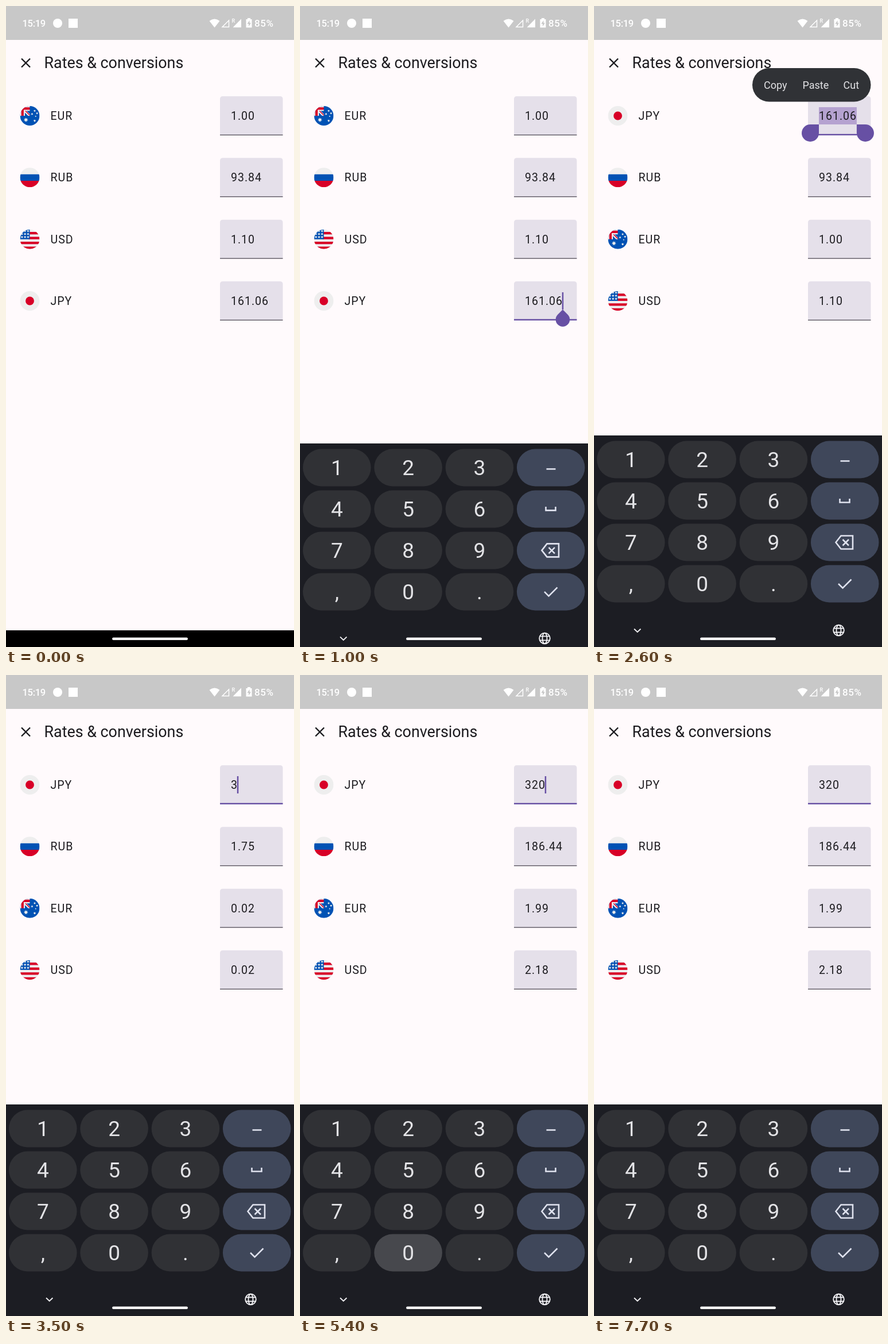
An HTML page for the animation above (8 s loop, 502 by 1115 pixels).

```html
<!DOCTYPE html>
<html lang="en">
<head>
<meta charset="utf-8">
<title>Rates &amp; conversions</title>
<style>
  html, body { margin: 0; width: 100%; height: 100%; overflow: hidden; background: #fffafc; }
  svg { display: block; }
  text { font-family: Roboto, sans-serif; }
  .body { font-size: 19.5px; letter-spacing: 1px; fill: #1c1b1f; }
  .digit { font-size: 37px; text-anchor: middle; fill: #e3e3e6; }
  .icon { fill: none; stroke: #dfe2ee; stroke-width: 2.6; }
  .menu text { font-size: 18px; fill: #e3e3e6; }
  .accent { fill: #6750a4; }
</style>
</head>
<body>
<svg id="stage" width="502" height="1115" viewBox="0 0 502 1115">
  <defs>
    <clipPath id="round"><circle cx="256" cy="256" r="256"/></clipPath>
    <clipPath id="inner"><rect x="391" y="-20" width="72" height="40"/></clipPath>
    <path id="grip" d="M0 0H15A15 15 0 1 1 0 15Z"/>
  </defs>
  <rect width="502" height="1115" fill="#fffafc"/>
  <rect width="502" height="59" fill="#c8c8c8"/>
  <g fill="#fff" font-weight="500">
    <text x="28.5" y="36" font-size="16.5" letter-spacing="-.3">15:19</text>
    <circle cx="90" cy="30" r="8"/>
    <rect x="109" y="22" width="16" height="16"/>
    <path d="M354.500 26Q363.500 19 372.500 26L363.500 37.500Z"/>
    <path d="M377 36.500H388.500V25Z" fill="none" stroke="#fff" stroke-width="1.500"/>
    <text x="393.500" y="29" font-size="9">R</text>
    <path d="M395.500 37.300L410 22.500V37.300Z"/>
    <path d="M421 21h5v2h2.500v14.500h-10V23h2.500Z"/>
    <path d="M424.500 25l-4 6h2.500v4.500l4-6h-2.500Z" fill="#c8c8c8"/>
    <text x="433" y="36" font-size="17" letter-spacing=".6">85%</text>
  </g>
  <path d="M27 91.500L42 106.500M42 91.500L27 106.500" stroke="#1c1b1f" stroke-width="2.400"/>
  <text x="66.500" y="108" font-size="26.850" fill="#1c1b1f">Rates &amp; conversions</text>

  <g id="rows"></g>

  <g id="menu" class="menu">
    <rect x="276" y="108" width="206.500" height="58.500" rx="29.250" fill="#303236"/>
    <text x="296" y="143.500">Copy</text>
    <text x="363.500" y="143.500">Paste</text>
    <text x="434.500" y="143.500">Cut</text>
  </g>

  <rect y="1086" width="502" height="29"/>
  <g id="board">
    <rect y="747" width="502" height="480" fill="#1c1d23"/>
    <g id="keys"></g>
    <g class="icon">
      <path d="M429.500 791.500h16"/>
      <path d="M428.500 857v6.500h17V857"/>
      <path d="M421.500 933l9-11.500h20.500v23h-20.500ZM433.500 928l10.500 10.500M444 928l-10.500 10.500"/>
      <path d="M426 1005l7.500 7.500 15-15"/>
    </g>
    <g fill="none" stroke="#f0f0f3" stroke-width="1.900">
      <path d="M70 1083.500l5.700 5.500 5.700-5.500"/>
      <circle cx="426.500" cy="1086" r="9.300"/>
      <ellipse cx="426.500" cy="1086" rx="4" ry="9.300"/>
      <path d="M418 1082.500h17M418 1089.500h17"/>
    </g>
  </g>
  <rect x="185" y="1098.500" width="132" height="4.500" rx="2.250" fill="#f5f5f5"/>
</svg>
<script>
const LOOP = 8000, STEP = 100, PITCH = 107.33, TEXT_X = 392;
const RED = '#d80027', BLUE = '#0052b4', WHITE = '#eee';
const $ = id => document.getElementById(id);
const clamp = v => Math.max(0, Math.min(1, v));
const within = (t, a, b) => t >= a && t < b;
const show = (el, on) => el.setAttribute('opacity', +on);

const shape = (fill, d) => `<path fill="${fill}" d="${d}"/>`;
function star(x, y, r, points) {
  let d = '';
  for (let i = 0; i < points * 2; i++) {
    const a = i * Math.PI / points - Math.PI / 2, q = i % 2 ? r * 0.48 : r;
    d += `${i ? 'L' : 'M'}${(x + q * Math.cos(a)).toFixed(1)} ${(y + q * Math.sin(a)).toFixed(1)}`;
  }
  return shape(WHITE, d + 'Z');
}
const field = color => shape(color, 'M0 0h512v512H0Z');
const usStars = [40, 120, 200].map(y => [50, 130, 210].map(x => star(x, y, 36, 5)).join('')).join('');
const flags = {
  EUR: field(BLUE)
    + shape(WHITE, 'M0 0v256h32l32-32 32 32h32v-83l83 83h45v-45l-83-83h83V96l-32-32 32-32V0Z')
    + shape(RED, 'M32 0v32H0v64h32v160h64V96h160V32H96V0ZM128 128l128 128v-31l-97-97Z')
    + star(154, 362, 62, 7) + star(383, 125, 32, 7) + star(315, 210, 32, 7)
    + star(446, 190, 32, 7) + star(410, 270, 22, 5) + star(383, 385, 36, 7),
  RUB: field(WHITE) + shape(BLUE, 'M0 171h512v170H0Z') + shape(RED, 'M0 341h512v171H0Z'),
  USD: field(WHITE) + shape(RED, 'M224 64h288v64H224Zm0 128h288v64H224ZM0 320h512v64H0Zm0 128h512v64H0Z')
    + shape(BLUE, 'M0 0h256v256H0Z') + usStars,
  JPY: field(WHITE) + `<circle cx="256" cy="256" r="112" fill="${RED}"/>`
};

// Rows: slots before and after sorting, starting value, rate per yen
const rows = [
  { code: 'EUR', from: 0, to: 2, start: '1.00', rate: 0.0062088 },
  { code: 'RUB', from: 1, to: 1, start: '93.84', rate: 0.582638 },
  { code: 'USD', from: 2, to: 3, start: '1.10', rate: 0.0068031 },
  { code: 'JPY', from: 3, to: 0, start: '161.06', rate: 1 }
];
$('rows').innerHTML = rows.map(r => `<g id="${r.code}">
  <svg x="24.500" y="-17" width="34" height="34" viewBox="0 0 512 512"><g clip-path="url(#round)">${flags[r.code]}</g></svg>
  <text class="body" x="77.500" y="7">${r.code}</text>
  <path d="M373 34V-29q0-5 5-5h99.500q5 0 5 5V34Z" fill="#e5e0ea"/>
  <rect class="line" x="373" y="32.800" width="109.500" height="1.200" fill="#49454f"/>
  ${r.code === 'JPY' ? '<rect id="mark" x="392" y="-15" height="30" fill="#b5a2d0"/>' : ''}
  <g clip-path="url(#inner)"><text class="body value" x="${TEXT_X}" y="7"></text></g>
  ${r.code === 'JPY' ? `<g class="accent">
    <rect id="caret" y="-15" width="2.500" height="30"/>
    <use id="drop" href="#grip"/>
    <g id="grips"><use href="#grip" transform="translate(392 15) scale(-1 1)"/><use id="end" href="#grip"/></g>
  </g>` : ''}
</g>`).join('');
rows.forEach(r => {
  r.el = $(r.code);
  r.value = r.el.querySelector('.value');
});
const yen = rows[3], line = yen.el.querySelector('.line');

const labels = ['1', '2', '3', '-', '4', '5', '6', '_', '7', '8', '9', '<', ',', '0', '.', 'ok'];
$('keys').innerHTML = labels.map((label, i) => {
  const x = 5 + i % 4 * 124.3, y = 756.5 + (i >> 2) * 72;
  const text = i % 4 < 3 ? `<text class="digit" x="${x + 59.3}" y="${y + 45.5}">${label}</text>` : '';
  return `<rect x="${x}" y="${y}" width="118.600" height="65" rx="32.500"/>${text}`;
}).join('');
const keys = [...$('keys').querySelectorAll('rect')];

const presses = [['3', 3300, 3500], ['2', 3600, 3800], ['0', 3900, 4100], ['0', 5400, 5700], ['<', 7100, 7300]];
const typed = [[3400, '3'], [3700, '32'], [4000, '320'], [5500, '3200'], [7200, '320']];
const FOCUS = 600, CARET = 800, SELECT = 2400, SORT = 1000;

function draw(t) {
  // Critically damped spring moves the rows
  const s = Math.max(0, t - SORT) / 50, sorted = t >= 1400 ? 1 : 1 - (1 + s) * Math.exp(-s);
  const edit = typed.filter(e => e[0] <= t).pop();
  for (const r of rows) {
    const y = 191 + PITCH * (r.from + (r.to - r.from) * sorted);
    r.el.setAttribute('transform', `translate(0 ${y})`);
    r.value.textContent = !edit ? r.start : r === yen ? edit[1] : (edit[1] * r.rate).toFixed(2);
  }

  const focused = t >= FOCUS;
  line.setAttribute('fill', focused ? '#6750a4' : '#49454f');
  line.setAttribute('y', focused ? 31.6 : 32.8);
  line.setAttribute('height', focused ? 2.4 : 1.2);

  const width = yen.value.getComputedTextLength(), end = TEXT_X + width;
  const selected = within(t, SELECT, typed[0][0]);
  const blink = (t - (edit ? edit[0] : CARET)) % 1000 < 500;
  $('caret').setAttribute('x', end - 1.2);
  show($('caret'), t >= CARET && blink && !selected);
  $('drop').setAttribute('transform', `translate(${end} 15) rotate(45) scale(.82)`);
  show($('drop'), within(t, CARET, SELECT));
  $('mark').setAttribute('width', width);
  show($('mark'), selected);
  $('end').setAttribute('transform', `translate(${end} 15)`);
  show($('grips'), selected);
  show($('menu'), t < typed[0][0] ? clamp((t - 2300) / 300) : clamp((3500 - t) / 200));

  // Keyboard rises a short way while fading in
  const rise = 1 - (1 - clamp((t - 875) / 200)) ** 2;
  $('board').setAttribute('transform', `translate(0 ${99 * (1 - rise)})`);
  show($('board'), clamp(rise * 3.8));
  keys.forEach((key, i) => {
    const down = presses.some(([label, a, b]) => label === labels[i] && within(t, a, b));
    const side = i % 4 === 3;
    key.setAttribute('fill', down ? (side ? '#555d71' : '#47484d') : side ? '#3f475a' : '#303135');
  });
}

function tick(now) {
  draw(Math.floor(now % LOOP / STEP) * STEP);
  requestAnimationFrame(tick);
}
draw(0);
requestAnimationFrame(tick);
</script>
</body>
</html>
```
